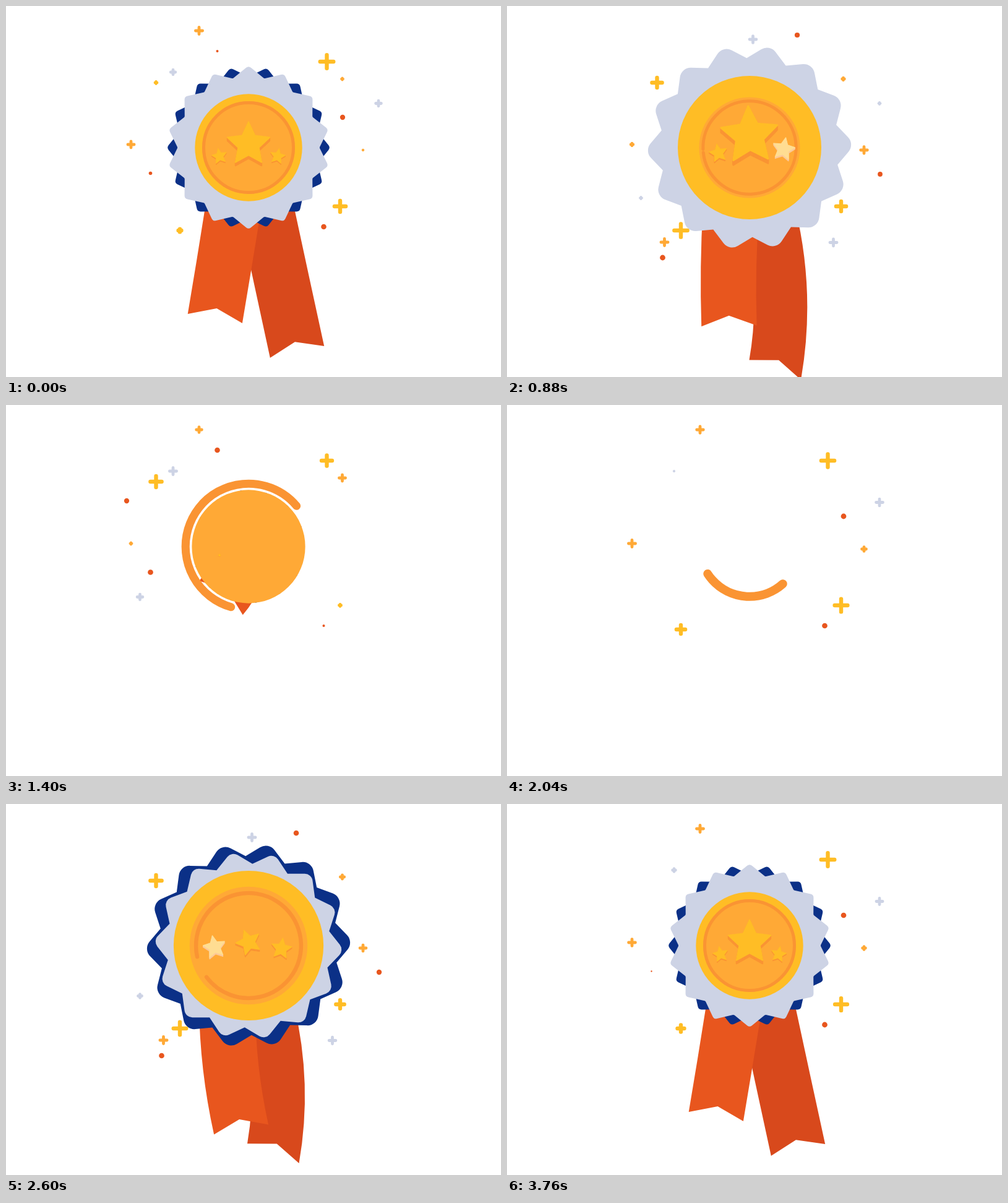
These frames come from a looping animation (800 px wide and 600 px high, 3800 ms). An HTML page with a canvas:

```html
<!DOCTYPE html>
<html lang="en">
<head>
<meta charset="utf-8">
<title>Award badge</title>
<style>
html, body { margin: 0; width: 100%; height: 100%; overflow: hidden; background: #fff; }
canvas { display: block; }
</style>
</head>
<body>
<canvas id="stage" width="800" height="600"></canvas>
<script>
const ctx = document.getElementById('stage').getContext('2d');
const LOOP = 3800, TURN = 1820, CX = 392, CY = 229, RAD = Math.PI / 180, TEETH = 14;
const GOLD = '#ffbd25', ORANGE = '#ffa936', AMBER = '#fa9433', RED = '#e8561e',
  DARK = '#d8491c', SILVER = '#cdd3e5', BLUE = '#0b3087';

const progress = (t, start, span) => Math.min(1, Math.max(0, (t - start) / span));
// Both run from 1 to 0: one brakes gently, the other eases at both ends.
const brake = (t, start, span, power = 2) => (1 - progress(t, start, span)) ** power;
const ease = (t, start, span) => (1 + Math.cos(Math.PI * progress(t, start, span))) / 2;

// Shoots up to a peak, then settles to rest.
function pop(t, start, rise, peak, fall, rest, power = 2) {
  const top = start + rise;
  return t < top ? peak * (1 - brake(t, start, rise, power)) : rest + (peak - rest) * ease(t, top, fall);
}

// Swing that dies out as the badge comes to rest.
const sway = (t, start, half, size) =>
  size * Math.sin(Math.PI * (t - start) / half) * Math.max(0, (3240 - t) / 640);

function disc(x, y, r, color) {
  if (r <= 0) return;
  ctx.fillStyle = color;
  ctx.beginPath();
  ctx.arc(x, y, r, 0, 7);
  ctx.fill();
}

// Strip from a 91 px wide top edge to a notched lower end; curve is the lean of its middle.
function ribbon(left, top, x, y, tilt, curve, color) {
  const c = Math.cos(tilt * RAD), s = Math.sin(tilt * RAD);
  const at = (along, up) => [x + along * c + up * s, y + along * s - up * c];
  const side = along => {
    const [ex, ey] = at(along, 0), rise = Math.max(0, ey - top) / 2;
    return [ex + rise * Math.tan(curve * RAD), ey - rise, ex, ey];
  };
  const [bx, by, ex, ey] = side(44.7);
  ctx.fillStyle = color;
  ctx.beginPath();
  ctx.moveTo(left, top);
  ctx.quadraticCurveTo(...side(-44.7));
  ctx.lineTo(...at(0, 16.7));
  ctx.lineTo(ex, ey);
  ctx.quadraticCurveTo(bx, by, left + 91, top);
  ctx.fill();
}

function ribbons(u) {
  const grow = 1 - brake(u, 2080, 160);
  if (!grow) return;
  const drop = t => pop(t, 2220, 400, 1.1, 300, 1);
  const front = drop(u), back = drop(u - 90);
  const swingF = sway(u, 2400, 470, -20.6), swingB = sway(u, 2440, 600, 44.5);
  const tiltF = 9.6 + swingF, tiltB = swingB - 12.3;
  const top = 325 - 75 * ease(u, 2240, 360);
  ctx.save();
  ctx.translate(CX, CY);
  ctx.scale(grow, grow);
  ctx.translate(-CX, -CY);
  ribbon(374.5, top, 410 + back * (46 - 1.18 * tiltB), 250 + 309.5 * back,
    tiltB, swingB * .67 - 12.3, DARK);
  ribbon(322 + Math.min(0, swingF) * .5, top, 355 - front * (2 * tiltF - 2), 290 + 215.5 * front,
    tiltF, 9.6 + swingF * 1.1, RED);
  ctx.restore();
}

function rosette(v, fall, twist, color) {
  const r = pop(v, 2060, 540, 165, fall, 130.5);
  if (r < 1) return;
  const turn = twist + 18 * ease(v, 2240, 840);
  const round = Math.min(6, r / 16) + Math.max(0, r - 130) * .33;
  const valley = Math.max(0, 9 - round);
  const point = i => {
    const a = (turn + i * 180 / TEETH - 90) * RAD, d = i % 2 ? r * .878 : r + round * .3;
    return [CX + d * Math.cos(a), CY + d * Math.sin(a)];
  };
  const [ax, ay] = point(0), [bx, by] = point(1);
  ctx.fillStyle = color;
  ctx.beginPath();
  ctx.moveTo((ax + bx) / 2, (ay + by) / 2);
  for (let i = 1; i <= 2 * TEETH; i++) {
    ctx.arcTo(...point(i), ...point(i + 1), i % 2 ? valley : round);
  }
  ctx.closePath();
  ctx.fill();
}

function ring(u) {
  const left = brake(u, 1920, 960, 2.15);
  if (left === 1) return;
  ctx.strokeStyle = AMBER;
  ctx.lineWidth = 5 + 9 * ease(u, 2100, 680);
  ctx.beginPath();
  ctx.arc(CX, CY, pop(u, 1780, 480, 102, 620, 72.5), (180 - 176 * left) * RAD, (540 - 525 * left) * RAD);
  ctx.stroke();
}

function starShape(x, y, r, turn) {
  ctx.beginPath();
  for (let i = 0; i < 10; i++) {
    const a = (turn - 90 + i * 36) * RAD, d = i % 2 ? r * .47 : r * .97;
    ctx.lineTo(x + d * Math.cos(a), y + d * Math.sin(a));
  }
  ctx.closePath();
  ctx.fill();
  ctx.stroke();
}

// The star drifts outward while it is larger than at rest, and flashes at its peak.
function star(v, x, y, size, tilt, driftX, driftY) {
  const scale = pop(v, 2220, 380, 1.44, 290, 1, 3);
  if (scale <= 0) return;
  const lift = Math.max(0, scale - 1) / .44, r = size * scale;
  const turn = tilt - 36 * brake(v, 2220, 380, 3);
  const flash = Math.abs(v - 2600) < 60;
  const paint = color => { ctx.fillStyle = ctx.strokeStyle = color; };
  x += driftX * lift;
  y += driftY * lift;
  ctx.lineWidth = r * .06;
  paint(flash ? '#fcc999' : AMBER);
  for (let d = r * .15; d > 0; d--) starShape(x, y + d, r, turn);
  paint(flash ? '#ffdd92' : GOLD);
  starShape(x, y, r, turn);
}

function plus(x, y, reach, width, color) {
  width = Math.min(width, reach * 1.2);
  const arm = reach - width / 2;
  ctx.strokeStyle = color;
  ctx.lineWidth = width;
  ctx.beginPath();
  ctx.moveTo(x - arm, y);
  ctx.lineTo(x + arm, y);
  ctx.moveTo(x, y - arm);
  ctx.lineTo(x, y + arm);
  ctx.stroke();
}

// Each colour has its own reach, stroke and lifetime; a stroke of 0 is a dot.
const KINDS = {
  [GOLD]: [14, 6.4, 660], [ORANGE]: [8, 4.8, 580], [SILVER]: [8, 4.8, 490], [RED]: [4.4, 0, 470]
};
// Three bursts per cycle; the sparkles of a burst peak one after the other.
const CYCLE = 880, STAGGER = 27;
const bursts = [
  { start: 200, at: [[540, 324, GOLD], [602, 157.5, SILVER], [202, 224, ORANGE], [544, 180, RED],
    [513.5, 357, RED], [518.5, 90, GOLD], [312, 40, ORANGE]] },
  { start: 520, at: [[270, 107, SILVER], [233.5, 270.5, RED], [341.5, 73, RED], [195, 155, RED],
    [543.5, 118, ORANGE], [216.5, 310.5, SILVER], [242.5, 124, GOLD]] },
  { start: 770, at: [[603, 272, RED], [469, 47, RED], [397.5, 54, SILVER], [254.5, 382, ORANGE],
    [251.5, 407, RED], [527.5, 382.5, SILVER], [281, 363, GOLD], [577, 233, ORANGE]] }
];

function sparkles(t) {
  // The cycle drags a little at the start and hurries at the end so that the loop closes.
  const phase = t + 360 * Math.max(0, 1 - t / 880) + 80 * Math.max(0, (t - 2920) / 880);
  for (const { start, at } of bursts) {
    at.forEach(([x, y, color], i) => {
      const [size, width, life] = KINDS[color];
      const off = (phase - start - i * STAGGER + 1.5 * CYCLE) % CYCLE - CYCLE / 2;
      if (Math.abs(off) >= life / 2) return;
      const reach = size * Math.cos(Math.PI * off / life) ** .4;
      if (width) plus(x, y, reach, width, color);
      else disc(x, y, reach, color);
    });
  }
}

function draw(now) {
  const t = now % LOOP;
  // The badge collapses by running its entrance backwards.
  const u = t < TURN ? 2 * TURN - t : t;
  ctx.clearRect(0, 0, 800, 600);
  ctx.lineCap = ctx.lineJoin = 'round';
  ribbons(u);
  rosette(u, 300, (ease(u, 2700, 400) - 1) * 180 / TEETH, BLUE);
  rosette(u - 160, 520, 0, SILVER);
  disc(CX, CY, pop(u, 2180, 460, 122, 440, 86.7), GOLD);
  disc(CX, CY, pop(u, 2080, 320, 105, 520, 75, 3), ORANGE);
  ring(u);
  star(u, 345, 243, 13.3, -11, -8, -12);
  star(u - 160, 439, 243, 13.3, 11, 8, -12);
  star(u - 320, CX, 223.6, 37, 0, 0, -18.6);
  sparkles(t);
}

function tick() {
  draw(performance.now());
  requestAnimationFrame(tick);
}
tick();
</script>
</body>
</html>
```
